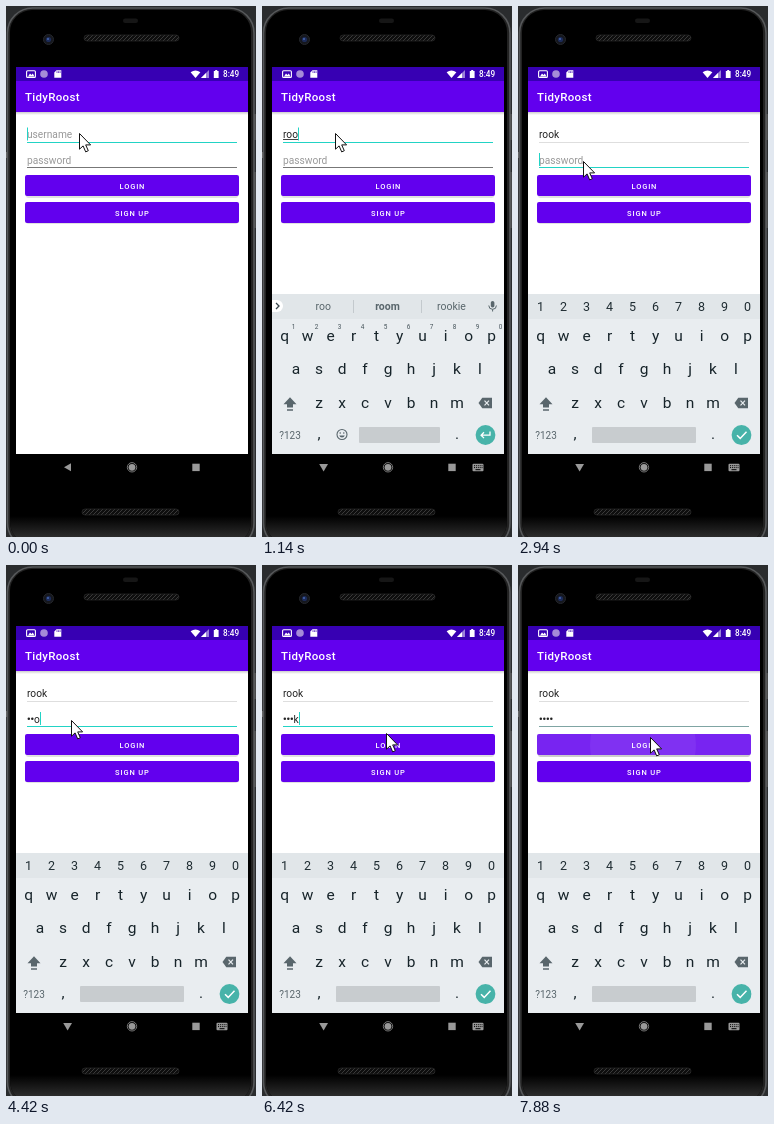
Animation, 250 px wide and 531 px high, one loop 8000 ms. Source, as an HTML page:

```html
<!DOCTYPE html>
<html lang="en">
<head>
<meta charset="utf-8">
<title>Login form</title>
<style>
  html, body { margin: 0; width: 100%; height: 100%; overflow: hidden; background: #2a2c2e; }
  svg { display: block; width: 100%; height: 100%; }
  text { font-family: Roboto, "Noto Sans", sans-serif; white-space: pre; }
  .mid { text-anchor: middle; }
  .field { font-size: 10.2px; }
  .caps { font-size: 7.5px; font-weight: 500; letter-spacing: .85px; fill: #fff; text-anchor: middle; }
  .key { font-size: 15.5px; fill: #17242a; text-anchor: middle; }
  .digit { font-size: 12.5px; fill: #1f2c32; text-anchor: middle; }
  .sup { font-size: 6.4px; fill: #45535a; text-anchor: middle; }
  .word { font-size: 10.5px; fill: #59666c; text-anchor: middle; }
</style>
</head>
<body>
<svg viewBox="0 0 250 531" preserveAspectRatio="none">
  <defs>
    <linearGradient id="drop" x2="0" y2="1">
      <stop stop-color="#000" stop-opacity=".2"/>
      <stop offset="1" stop-color="#000" stop-opacity="0"/>
    </linearGradient>
    <linearGradient id="chin" x2="0" y2="1">
      <stop stop-color="#000"/>
      <stop offset="1" stop-color="#2c2c2c"/>
    </linearGradient>
    <pattern id="mesh" width="4" height="4" patternUnits="userSpaceOnUse">
      <rect width="4" height="4" fill="#0e0e0e"/>
      <path d="M0 4L4 0" stroke="#3a3a3a"/>
    </pattern>
    <clipPath id="loginClip"><rect x="19" y="169" width="214" height="21" rx="2"/></clipPath>
    <clipPath id="screenClip"><rect x="10" y="61" width="232" height="387"/></clipPath>
    <clipPath id="bodyClip"><rect x="4" y="4" width="241" height="534" rx="22"/></clipPath>
  </defs>

  <!-- phone body -->
  <rect x="1.5" y="2" width="246.5" height="540" rx="25" fill="#222" stroke="#56585a" stroke-width="1.6"/>
  <g clip-path="url(#bodyClip)">
    <rect width="250" height="540"/>
    <rect y="510" width="250" height="21" fill="url(#chin)"/>
  </g>
  <path d="M.5 146V152M249 108V134M249 166V222" stroke="#666" fill="none"/>
  <rect x="117" y="12.5" width="15" height="4.5" rx="2.2" fill="#161616"/>
  <circle cx="42.5" cy="33.5" r="5" fill="#15171d" stroke="#25272c"/>
  <circle cx="42.5" cy="33.5" r="2.6" fill="#1c2b58"/>
  <circle cx="42" cy="33" r="1" fill="#4668b0"/>
  <rect x="78" y="29" width="95" height="6" rx="3" fill="url(#mesh)" stroke="#2a2a2a" stroke-width=".7"/>
  <rect x="76" y="503" width="97" height="6" rx="3" fill="url(#mesh)" stroke="#2a2a2a" stroke-width=".7"/>

  <g clip-path="url(#screenClip)">
    <rect x="10" y="61" width="232" height="387" fill="#fff"/>
    <rect x="10" y="106" width="232" height="3" fill="url(#drop)"/>
    <rect x="10" y="75" width="232" height="31" fill="#6200ee"/>
    <rect x="10" y="61" width="232" height="14" fill="#3700b3"/>

    <!-- status bar -->
    <rect x="20.6" y="64.8" width="8.8" height="6.6" rx="1" fill="none" stroke="#fff" stroke-width="1.1"/>
    <path d="M22 70.5L24 67.5L25.5 69L26.8 67.5L28.5 70.5Z" fill="#fff"/>
    <circle cx="38" cy="68" r="3.8" fill="#a58bd8"/>
    <path d="M50.5 64.2H55.3V71.8H48.3V66.5Z" fill="#fff"/>
    <path d="M51 65.2V67M52.6 65.2V67M54.1 65.2V67" stroke="#3700b3" stroke-width=".7"/>
    <path d="M184.6 66.2Q189.5 62.6 194.4 66.2L189.5 72Z" fill="#fff"/>
    <path d="M203 64V72H195Z" fill="#9a80d9"/>
    <path d="M200 67V72H195Z" fill="#fff"/>
    <path d="M207.8 65H209.2V64H211.2V65H212.6V72H207.8Z" fill="#fff"/>
    <text x="217" y="71.2" font-size="8.2" font-weight="500" fill="#fff">8:49</text>
    <text x="19" y="94.8" font-size="11.5" font-weight="500" letter-spacing=".3" fill="#fff">TidyRoost</text>

    <!-- form -->
    <rect id="userLine" x="21" y="136" width="210" height="1"/>
    <rect id="passLine" x="21" y="161" width="210" height="1"/>
    <rect id="userMark" x="21" y="133" height="1" fill="#444"/>
    <text id="user" class="field" x="21" y="131.8"></text>
    <text id="pass" class="field" x="21" y="157.5"></text>
    <g id="dots" fill="#222"></g>
    <rect id="caret" width="1" height="13" fill="#22d3c5"/>

    <rect id="shadow" x="20" y="172" width="212" height="20" rx="2.5"/>
    <rect x="20" y="198" width="212" height="20" rx="2.5" opacity=".12"/>
    <rect x="19" y="169" width="214" height="21" rx="2" fill="#6200ee"/>
    <rect x="19" y="196" width="214" height="21" rx="2" fill="#6200ee"/>
    <g clip-path="url(#loginClip)" fill="#fff">
      <rect id="glow" x="19" y="169" width="214" height="21"/>
      <circle id="ripple" cx="125" cy="180"/>
    </g>
    <text class="caps" x="126.4" y="182.7">LOGIN</text>
    <text class="caps" x="126.4" y="209.7">SIGN UP</text>

    <!-- keyboard -->
    <g id="keyboard">
      <rect x="10" y="288" width="232" height="160" fill="#e9edf0"/>
      <rect x="10" y="288" width="232" height="25" fill="#e1e6e9"/>
      <g id="keys"></g>
      <path d="M28 391.3L34.5 398.3H31V401.5H25V398.3H21.5ZM25 403.2H31V404.7H25Z" fill="#59666c"/>
      <path d="M216.5 397L220.3 391.7H230V402.3H220.3Z" fill="#59666c"/>
      <path d="M222.5 394.7L227 399.3M227 394.7L222.5 399.3" stroke="#e9edf0" stroke-width="1.2"/>
      <text class="mid" x="28" y="432.6" font-size="10" fill="#59666c">?123</text>
      <text class="key" x="57" y="433">,</text>
      <text class="key" x="195" y="433">.</text>
      <rect id="space" y="421" height="16" rx="1" fill="#c8cccf"/>
      <circle cx="223.5" cy="429" r="9.9" fill="#47b3a9"/>
      <g id="wordMode">
        <path d="M10 294H15A6 6 0 0 1 15 306H10Z" fill="#fff"/>
        <path d="M14 297L17 300L14 303" fill="none" stroke="#37444a" stroke-width="1.3"/>
        <path d="M91.5 294V307M159.5 294V307" stroke="#c3c9cd"/>
        <text id="word0" class="word" x="61.3" y="304"></text>
        <text id="word1" class="word" x="125.5" y="304"></text>
        <text id="word2" class="word" x="189.5" y="304"></text>
        <rect x="228.8" y="295" width="3.6" height="6.6" rx="1.8" fill="#59666c"/>
        <path d="M226.8 299.5A3.8 3.8 0 0 0 234.4 299.5M230.6 303.3V305.5" fill="none" stroke="#59666c"/>
        <g id="sups"></g>
        <circle cx="80" cy="428.5" r="5" fill="none" stroke="#59666c" stroke-width="1.1"/>
        <path d="M77.2 429.6A3 3 0 0 0 82.8 429.6Z" fill="#59666c"/>
        <circle cx="78.2" cy="427" r=".8" fill="#59666c"/>
        <circle cx="81.8" cy="427" r=".8" fill="#59666c"/>
        <path d="M228 425.5V429.2H219.3M222 426.3L219.1 429.2L222 432.1" fill="none" stroke="#fff" stroke-width="1.3"/>
      </g>
      <g id="passMode">
        <g id="digits"></g>
        <path d="M219 429.3L222.2 432.4L228.5 425.8" fill="none" stroke="#fff" stroke-width="1.5"/>
      </g>
    </g>
  </g>

  <!-- navigation bar -->
  <g fill="#999">
    <path id="back" d="M58 461.3L65 457.3V465.3Z"/>
    <path id="hide" d="M57.2 458H66L61.6 465.4Z"/>
    <circle cx="126" cy="461.3" r="4.7" fill="none" stroke="#777"/>
    <circle cx="126" cy="461.3" r="3.4"/>
    <rect x="186.3" y="457.7" width="7.4" height="7.4"/>
    <g id="switcher">
      <rect x="210.5" y="457.8" width="11" height="7.4" rx="1"/>
      <path d="M212 459.7H220.5M212 461.6H220.5" stroke="#000" stroke-dasharray="1 .9"/>
      <path d="M213.5 463.7H218.5" stroke="#000"/>
    </g>
  </g>

  <path id="pointer" d="M.5 .5V16.2L4.1 12.9L6.7 18.9L9.3 17.7L6.7 11.9H11.6Z" fill="#fff" stroke="#111" stroke-linejoin="round"/>
</svg>
<script>
const LOOP = 8000;
const TEAL = "#22d3c5";
const DOT_STEP = 3.5;
const $ = id => document.getElementById(id);
const show = (id, on) => $(id).setAttribute("display", on ? "inline" : "none");
const set = (id, attrs) => {
  for (const name in attrs) $(id).setAttribute(name, attrs[name]);
};

function add(parent, tag, attrs, text = "") {
  const node = document.createElementNS("http://www.w3.org/2000/svg", tag);
  for (const name in attrs) node.setAttribute(name, attrs[name]);
  node.textContent = text;
  $(parent).append(node);
  return node;
}

function addRow(parent, chars, cls, x, y) {
  [...chars].forEach((char, i) => add(parent, "text", { class: cls, x: x + i * 23, y }, char));
}

addRow("keys", "qwertyuiop", "key", 22.6, 335);
addRow("keys", "asdfghjkl", "key", 34, 368);
addRow("keys", "zxcvbnm", "key", 57, 401.5);
addRow("sups", "1234567890", "sup", 31.5, 323);
addRow("digits", "1234567890", "digit", 22.6, 305);
const dots = [0, 1, 2, 3].map(i => add("dots", "circle", { cx: 22.8 + i * DOT_STEP, cy: 153.7, r: 1.25 }));

// Each track holds [start time, ...values]; the latest started entry applies.
const tracks = {
  user: [[0, ""], [590, "ro"], [1020, "roo"], [1600, "rook"]],
  words: [
    [0, "thanks", "I", "we"], [590, "ro", "room", "road"], [1020, "roo", "room", "road"],
    [1140, "roo", "room", "rookie"], [1600, "rook", "Rook", "rookie"]
  ],
  // hidden characters, then the one still readable
  pass: [[0, 0, ""], [3990, 0, "r"], [4110, 1, "o"], [4420, 2, "o"], [5250, 3, "k"], [6690, 4, ""]],
  caret: [
    [0, 1], [2210, 0], [2660, 1], [3400, 0], [3990, 1], [4980, 0], [5250, 1],
    [5850, 0], [6300, 1], [6690, 0], [7310, 1], [7730, 0]
  ],
  pointer: [
    [0, 73, 127], [2360, 73, 134], [2510, 66, 155], [2790, 65, 155], [6150, 102, 158],
    [6300, 124, 168], [6850, 124, 174], [7580, 130, 171], [7730, 132, 172]
  ],
  // shadow, overlay, ripple radius, ripple opacity
  press: [[0, .12, 0, 0, 0], [7580, .17, .02, 0, 0], [7730, .2, .08, 28, .05], [7880, .2, .14, 53, .06]]
};

function at(name, t) {
  return tracks[name].findLast(entry => entry[0] <= t).slice(1);
}

function draw(t) {
  const inPass = t >= 2940;
  const [user] = at("user", t);
  const [hidden, last] = at("pass", t);
  const words = at("words", t);
  const [px, py] = at("pointer", t);
  const [shade, glow, radius, alpha] = at("press", t);

  $("user").textContent = user || "username";
  set("user", { fill: user ? "#222" : "#999" });
  const userWidth = user ? $("user").getComputedTextLength() : 0;
  set("userMark", { width: inPass ? 0 : userWidth });
  set("userLine", { fill: inPass ? "#dedede" : TEAL });

  const empty = !hidden && !last;
  $("pass").textContent = empty ? "password" : last;
  set("pass", { x: 21 + hidden * DOT_STEP, fill: empty ? "#999" : "#222" });
  dots.forEach((dot, i) => dot.setAttribute("display", i < hidden ? "inline" : "none"));
  const passWidth = hidden * DOT_STEP + (last ? $("pass").getComputedTextLength() : 0);
  const pressed = t >= 7730;
  set("passLine", { fill: pressed ? "#7fa5a3" : inPass ? TEAL : "#777" });

  show("caret", at("caret", t)[0]);
  set("caret", {
    x: Math.round(21 + (inPass ? passWidth : userWidth)),
    y: inPass ? 147 : 121.5
  });

  show("keyboard", t >= 150);
  show("switcher", t >= 150);
  show("hide", t >= 150);
  show("back", t < 150);
  show("wordMode", !inPass);
  show("passMode", inPass);
  set("space", inPass ? { x: 74, width: 104 } : { x: 97, width: 81 });
  words.forEach((word, i) => $("word" + i).textContent = word);
  set("word1", { "font-weight": user ? 700 : 400 });

  set("shadow", { opacity: shade });
  set("glow", { opacity: glow });
  set("ripple", { r: radius, opacity: alpha });
  set("pointer", { transform: `translate(${px} ${py})` });
}

function tick(now) {
  draw(now % LOOP);
  requestAnimationFrame(tick);
}
draw(0);
requestAnimationFrame(tick);
</script>
</body>
</html>
```
